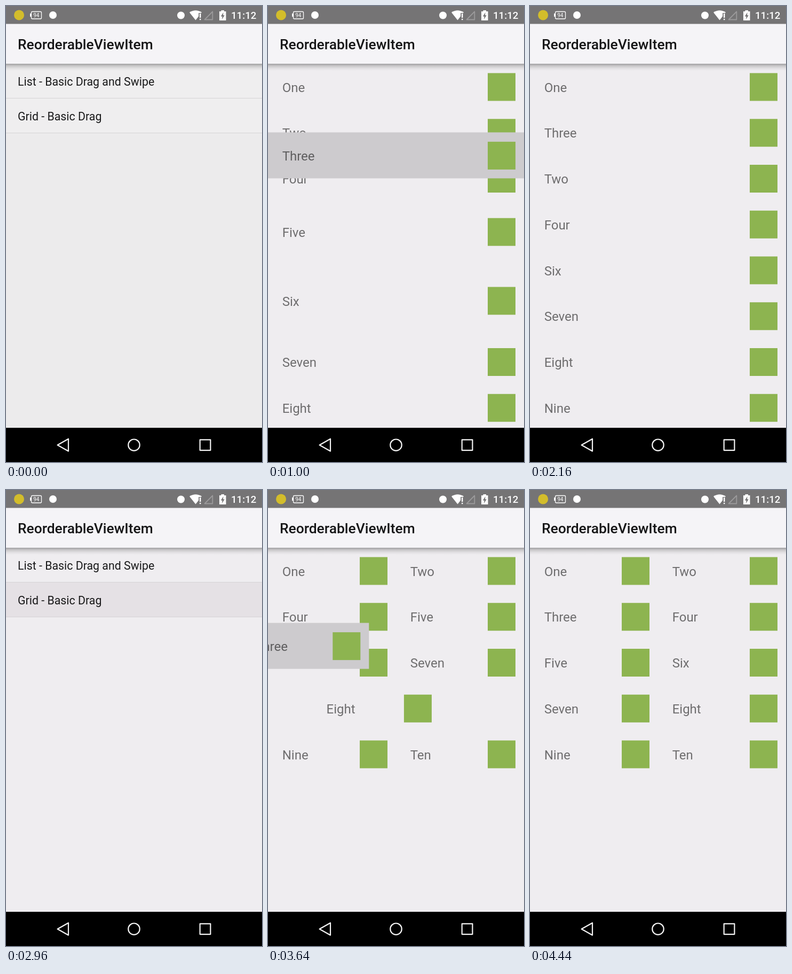
Animation, 480 px wide and 853 px high, one loop 4480 ms. Source, as an HTML page with a canvas:

```html
<!DOCTYPE html>
<html lang="en">
<head>
<meta charset="utf-8">
<title>Reorderable lists</title>
<style>
  html, body { margin: 0; width: 100%; height: 100%; overflow: hidden; background: #000; }
  canvas { display: block; width: 480px; height: 853px; }
</style>
</head>
<body>
<canvas id="stage" width="480" height="853"></canvas>
<script>
const ctx = document.getElementById('stage').getContext('2d');
const W = 480, TOP = 108, BOTTOM = 789, PITCH = 85.75, LOOP = 4480, STEP = 40, MOVE = 140;
const PAPER = '#efedf0', LIFTED = '#cdcbce', GREEN = '#8db450', INK = 'rgba(0,0,0,.54)';
const NAMES = ['One', 'Two', 'Three', 'Four', 'Five', 'Six', 'Seven', 'Eight', 'Nine', 'Ten'];

const clamp = v => Math.max(0, Math.min(1, v));
const ease = p => (1 - Math.cos(Math.PI * clamp(p))) / 2;
const ramp = (t, from, to) => clamp((t - from) / (to - from));
const mix = (a, b, p) => a + (b - a) * p;

// Smooth curve through [time, value] points that never overshoots them.
function follow(points, t) {
  const n = points.length - 1;
  if (t <= points[0][0]) return points[0][1];
  if (t >= points[n][0]) return points[n][1];
  const slope = i => (points[i + 1][1] - points[i][1]) / (points[i + 1][0] - points[i][0]);
  const tangent = i => {
    if (i === 0 || i === n) return 0;
    const a = slope(i - 1), b = slope(i);
    return a * b > 0 ? 2 * a * b / (a + b) : 0;
  };
  let i = 0;
  while (points[i + 1][0] < t) i++;
  const [t0, v0] = points[i], [t1, v1] = points[i + 1];
  const h = t1 - t0, p = (t - t0) / h, q = 1 - p;
  return v0 * (1 + 2 * p) * q * q + v1 * p * p * (3 - 2 * p)
       + h * p * q * (tangent(i) * q - tangent(i + 1) * p);
}

// Slot changes per item: [start time, new slot]
const listMoves = {
  Two: [[1030, 2]],
  Four: [[380, 2], [1000, 3]],
  Five: [[417, 3], [963, 4]],
  Six: [[455, 4], [915, 5], [1710, 4]],
  Seven: [[1710, 5]],
  Eight: [[1710, 6]],
  Nine: [[1710, 7]],
  Ten: [[1710, 8]]
};
const gridMoves = {
  Four: [[3330, 2], [3690, 3]],
  Five: [[3330, 3], [3690, 4]],
  Six: [[3385, 4], [3645, 5]],
  Seven: [[3385, 5], [3645, 6]],
  Eight: [[3440, 6], [3584, 7]]
};

const listDragY = [[320, 279.5], [385, 365], [417, 451], [455, 537], [520, 599.8], [600, 609],
  [800, 590], [880, 530], [915, 448], [963, 345], [1000, 236.4], [1060, 188], [1120, 186], [1180, 193.75]];
const swipeX = [[1420, 0], [1470, -50], [1520, -143], [1570, -320], [1640, -480]];
const gridDragX = [[3280, 0], [3400, 20], [3460, 90], [3540, 20], [3584, -30], [3640, -50.7],
  [3720, -45], [3900, -20], [4100, -8], [4240, 0]];
const gridDragY = [[3260, 193.75], [3340, 290], [3400, 372], [3480, 382], [3560, 376], [3584, 360],
  [3640, 248.6], [3700, 200], [3800, 187], [4000, 200], [4240, 193.75]];

const listSlot = i => [0, TOP + PITCH * i];
const gridSlot = i => [240 * (i % 2), TOP + PITCH * (i >> 1)];

function place(home, moves, slot, t) {
  let at = slot(home);
  for (const [start, to] of moves || []) {
    const goal = slot(to), p = ease((t - start) / MOVE);
    at = [mix(at[0], goal[0], p), mix(at[1], goal[1], p)];
  }
  return at;
}

function text(str, x, y, size, color, weight = 400) {
  ctx.font = `${weight} ${size}px Roboto, sans-serif`;
  ctx.fillStyle = color;
  ctx.fillText(str, x, y);
}

function rect(x, y, w, h, color) {
  ctx.fillStyle = color;
  ctx.fillRect(x, y, w, h);
}

function dot(x, y, r, color) {
  ctx.fillStyle = color;
  ctx.beginPath();
  ctx.arc(x, y, r, 0, 7);
  ctx.fill();
}

function poly(...pts) {
  ctx.beginPath();
  for (let i = 0; i < pts.length; i += 2) ctx.lineTo(pts[i], pts[i + 1]);
  ctx.closePath();
}

function cell(name, x, y, width, lift = 0, alpha = 1) {
  ctx.save();
  const base = ctx.globalAlpha;
  if (lift) {
    ctx.globalAlpha = base * lift;
    rect(x, y, width, 86, LIFTED);
  }
  ctx.globalAlpha = base * alpha;
  text(name, x + 26.67, y + 52.6, 24, INK);
  rect(x + width - 68, y + 17.5, 52, 52, GREEN);
  ctx.restore();
}

function drawMenu(t) {
  const early = t < 120;
  rect(0, TOP, W, BOTTOM - TOP, early ? '#ecebec' : PAPER);
  if (early) rect(0, TOP, W, 129, '#efeeef');
  const press = [ramp(t, 60, 120) * (t < 1000), ramp(t, 2860, 2940)];
  ['List - Basic Drag and Swipe', 'Grid - Basic Drag'].forEach((label, i) => {
    const y = TOP + 65 * i;
    rect(0, y, W, 64, `rgba(229,225,229,${press[i]})`);
    rect(0, y + 64, W, 1, '#d5d3d6');
    text(label, 22, y + 40.6, 21.33, '#19191a');
  });
}

function drawList(t) {
  rect(0, TOP, W, BOTTOM - TOP + 90, PAPER);
  const swiping = t >= 1400;
  NAMES.forEach((name, i) => {
    if (name === 'Three' || (name === 'Five' && swiping)) return;
    cell(name, ...place(i, listMoves[name], listSlot, t), W);
  });
  if (swiping && t < 1640) {
    const x = follow(swipeX, t);
    cell('Five', x, listSlot(4)[1], W, ramp(t, 1400, 1440), 1 + x / W);
  }
  const lift = ramp(t, 280, 320) * (1 - ramp(t, 1160, 1200));
  cell('Three', 0, follow(listDragY, t), W, lift);
}

function drawGrid(t) {
  rect(0, TOP, W, BOTTOM - TOP + 90, PAPER);
  NAMES.forEach((name, i) => {
    if (name !== 'Three') cell(name, ...place(i, gridMoves[name], gridSlot, t), 240);
  });
  const lift = ramp(t, 3200, 3250) * (1 - ramp(t, 4220, 4260));
  cell('Three', follow(gridDragX, t), follow(gridDragY, t), 240, lift);
}

// Page that fades in while rising into place.
function overlay(draw, t, shown) {
  if (shown <= 0) return;
  ctx.save();
  ctx.globalAlpha = shown;
  ctx.translate(0, 55 * (1 - shown) ** 2);
  draw(t);
  ctx.restore();
}

function drawHeader() {
  const shade = ctx.createLinearGradient(0, TOP, 0, TOP + 13);
  shade.addColorStop(0, 'rgba(0,0,0,.33)');
  shade.addColorStop(.35, 'rgba(0,0,0,.15)');
  shade.addColorStop(.7, 'rgba(0,0,0,.05)');
  shade.addColorStop(1, 'rgba(0,0,0,0)');
  rect(0, TOP, W, 13, shade);
  rect(0, 33, W, TOP - 33, '#f5f4f7');
  text('ReorderableViewItem', 22, 81, 26.4, '#151516', 500);
}

function drawStatus() {
  rect(0, 0, W, 33.5, '#757475');
  dot(24.5, 17, 9.5, '#d3bd2b');
  ctx.strokeStyle = '#fff';
  ctx.lineWidth = 1.3;
  ctx.beginPath();
  ctx.roundRect(47.5, 10.5, 19, 13.5, 2);
  ctx.stroke();
  rect(45, 14, 2, 6, '#fff');
  text('94', 51.2, 21, 10, '#fff');
  dot(88, 17, 7, '#fff');
  dot(328, 17.5, 7, '#fff');

  ctx.fillStyle = '#fff';
  ctx.beginPath();
  ctx.moveTo(355.5, 26.5);
  ctx.lineTo(344, 12);
  ctx.quadraticCurveTo(355.5, 4.5, 367, 12);
  ctx.closePath();
  ctx.fill();
  rect(361.2, 13, 5.8, 14, '#757475');
  rect(363, 14, 2.4, 8, '#fff');
  rect(363, 23.8, 2.4, 2.4, '#fff');

  ctx.strokeStyle = '#9b9a9b';
  ctx.lineWidth = 1.8;
  poly(387.3, 10.5, 387.3, 25.5, 372.5, 25.5);
  ctx.stroke();

  rect(400, 10, 12.5, 17, '#fff');
  rect(403.5, 8, 5.5, 2.5, '#fff');
  ctx.fillStyle = '#757475';
  poly(407.5, 12, 402.8, 19.5, 405.6, 19.5, 405, 25, 409.8, 17.3, 407, 17.3);
  ctx.fill();
  text('11:12', 422, 24, 18.67, '#fff', 500);
}

function drawNav(t) {
  rect(0, BOTTOM, W, 853 - BOTTOM, '#000');
  const tap = ramp(t, 2320, 2520);
  if (tap > 0 && tap < 1) {
    ctx.save();
    ctx.beginPath();
    ctx.rect(0, BOTTOM, W, 64);
    ctx.clip();
    dot(107, 821, 20 + 30 * ease(tap * 2), `rgba(255,255,255,${.28 * (1 - tap)})`);
    ctx.restore();
  }
  ctx.strokeStyle = '#f4f4f4';
  ctx.lineWidth = 2.2;
  ctx.lineJoin = 'round';
  poly(96.6, 821.2, 117, 809.7, 117, 832.7);
  ctx.stroke();
  ctx.beginPath();
  ctx.arc(240, 821.2, 10.7, 0, 7);
  ctx.stroke();
  ctx.strokeRect(363.7, 811.4, 19.7, 19.7);
}

function render(t) {
  drawMenu(t);
  if (t < 2600) overlay(drawList, t, ramp(t, 150, 240) * (1 - ramp(t, 2400, 2500)));
  else overlay(drawGrid, t, ramp(t, 3030, 3130));
  drawHeader();
  drawStatus();
  drawNav(t);
}

// The screen refreshes 25 times a second; the small lead absorbs timer jitter.
const began = performance.now();
function tick() {
  const beat = Math.floor((performance.now() - began + 4) / STEP);
  render(beat * STEP % LOOP);
  requestAnimationFrame(tick);
}
tick();
</script>
</body>
</html>
```
